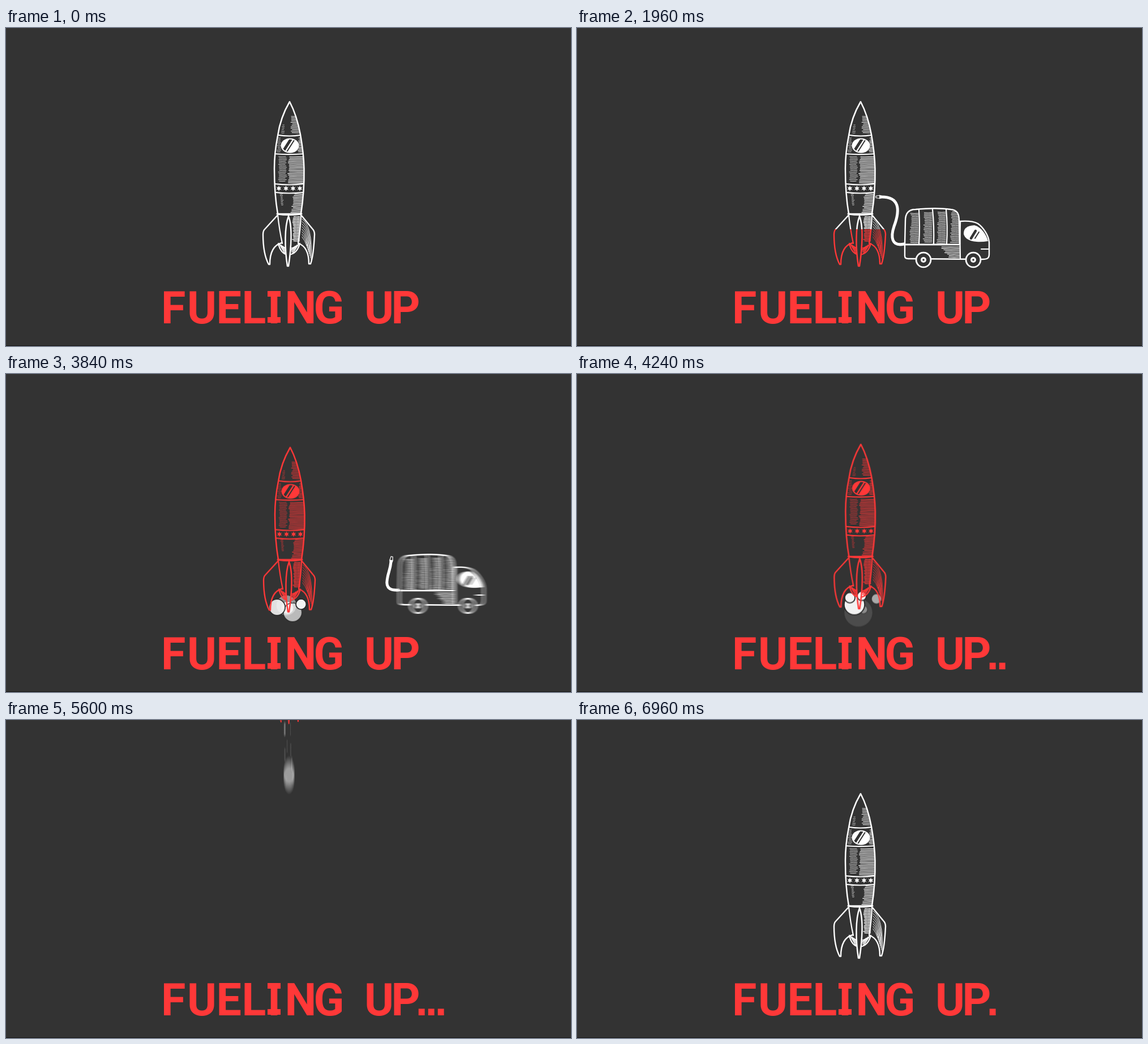
Write an HTML page with a canvas that moves like this. It is 998 px wide and 561 px high and loops after 7 s.

```html
<!DOCTYPE html>
<html lang="en">
<head>
<meta charset="utf-8">
<title>Fueling up</title>
<style>
  html, body { margin: 0; width: 100%; height: 100%; overflow: hidden; background: #333; }
  canvas, svg { position: absolute; left: 0; top: 0; width: 998px; height: 561px; }
  text { font: 700 79px Roboto, sans-serif; fill: #ff3838; }
  .dot { font: 700 77px "Liberation Sans", Arial, sans-serif; }
</style>
</head>
<body>
<canvas id="stage" width="998" height="561"></canvas>
<svg viewBox="0 0 998 561">
  <text y="520.5" x="274 320 371.5 416.5 462 492.5 543.5 605 633 680.5">FUELING UP</text>
  <path d="M462 464h23v10h-23zM462 510h23v10h-23z" fill="#ff3838"/>
  <text class="dot" x="723.5" y="520.5">.</text>
  <text class="dot" x="740.5" y="520.5">.</text>
  <text class="dot" x="757.5" y="520.5">.</text>
  <path d="M0 560h998v1H0z" fill="#151515"/>
</svg>
<script>
const W = 998, H = 561, LOOP = 7000, SHUTTER = 20;
const BG = '#333333', WHITE = '#ffffff', RED = '#ff3838';
const ctx = document.getElementById('stage').getContext('2d');
const dots = document.querySelectorAll('.dot');

function surface() {
  const c = document.createElement('canvas');
  c.width = W;
  c.height = H;
  const g = c.getContext('2d');
  g.lineCap = g.lineJoin = 'round';
  return g;
}

function seeded(s) {
  return () => (s = (s * 16807) % 2147483647) / 2147483647;
}

const clamp = (v, a = 0, b = 1) => Math.max(a, Math.min(b, v));
const mix = (a, b, k) => a + (b - a) * k;
const ramp = (t, a, b) => clamp((t - a) / (b - a));
const smooth = u => u * u * (3 - 2 * u);

function line(g, d, color, width) {
  g.strokeStyle = color;
  g.lineWidth = width;
  g.stroke(new Path2D(d));
}

function shape(g, d, color) {
  g.fillStyle = color;
  g.fill(new Path2D(d));
}

function disc(g, x, y, rx, color, ry = rx) {
  g.fillStyle = color;
  g.beginPath();
  g.ellipse(x, y, rx, ry, 0, 0, 7);
  g.fill();
}

// Rows of short engraved strokes; the left end moves from x1 to x2 with some noise.
function hatch(g, rnd, color, y1, y2, x1, x2, right, step = 2.6, noise = 4, width = 1.1) {
  for (let y = y1; y <= y2; y += step) {
    const x = mix(x1, x2, (y - y1) / (y2 - y1)) + rnd() * noise;
    const end = typeof right === 'function' ? right(rnd) : right;
    line(g, `M${x} ${y}Q${(x + end) / 2} ${y + 0.8} ${end} ${y}`, color, width);
  }
}

function star(g, x, y, color) {
  g.fillStyle = color;
  g.beginPath();
  for (let i = 0; i < 12; i++) {
    const r = i % 2 ? 2.3 : 5, a = i * Math.PI / 6 - Math.PI / 2;
    g.lineTo(x + r * Math.cos(a), y + r * Math.sin(a));
  }
  g.fill();
}

function makeRocket(color) {
  const g = surface(), rnd = seeded(77);
  const body = 'M501 130C491 147 483 169 480 190C477 205 474 228 474 248C474 280 476 305 480 328' +
    'L521 328C525 302 527 275 526.5 248C526 226 523 205 520 188C516 166 510 147 501 130Z';
  g.save();
  g.clip(new Path2D(body));
  hatch(g, rnd, color, 156, 187, 504, 501, 530, 2.6, 4, 1);
  hatch(g, rnd, color, 171, 187, 488, 486, r => 490 + r() * 2, 2.8, 1, 0.7);
  hatch(g, rnd, color, 194, 220, 517, 515, 530, 2.7, 2);
  hatch(g, rnd, color, 194, 220, 480, 478, r => 484 + r() * 2, 2.7, 2, 0.7);
  hatch(g, rnd, color, 227, 273, 499, 497, 530, 2.7, 3, 1.2);
  hatch(g, rnd, color, 227, 272, 481, 481, r => 493 + r() * 3, 2.7, 2, 0.8);
  hatch(g, rnd, color, 293, 326, 507, 503, 530, 2.7, 4, 1.2);
  hatch(g, rnd, color, 293, 312, 484, 486, r => 488 + r() * 2, 2.7, 1, 0.8);
  g.restore();

  line(g, body, color, 2.5);
  line(g, 'M481 189Q501 192 520 189M475 222Q500 224 525 222M475 275Q500 278 526 275' +
    'M476 290Q500 293 525 290', color, 2.2);
  line(g, 'M479 328Q500 331 522 328', color, 3);
  for (const x of [482, 494.5, 507, 519]) star(g, x, 283, color);

  disc(g, 501.5, 207.5, 16, color, 13);
  g.save();
  g.beginPath();
  g.ellipse(501.5, 207.5, 14, 11, 0, 0, 7);
  g.clip();
  g.globalCompositeOperation = 'destination-out';
  line(g, 'M488 220L504 195', '#000', 5);
  line(g, 'M495 220L509 198', '#000', 2);
  g.restore();

  // tail section
  hatch(g, rnd, color, 333, 377, 506, 506, 518.5, 2.5, 3, 1.3);
  line(g, 'M480 330Q483 357 488 380M521 330Q520 357 516 380', color, 2.2);
  line(g, 'M481 380Q485 399 499 400Q514 399 519 380', color, 2.2);
  for (let i = 0; i < 4; i++) {
    line(g, `M${483 + i * 3} ${381 + i * 2}L${493 + i} ${398 - i * 3}` +
      `M${517 - i * 3} ${381 + i * 2}L${506 - i} ${398 - i * 3}`, color, 1.8);
  }
  for (let i = 0; i < 8; i++) {
    line(g, `M523 ${337 + i * 4.5}Q${542 - i * 2} ${350 + i * 3.5} ${539 - i * 1.1} ${409 - i * 3.5}`, color, 0.9);
  }
  line(g, 'M479 331L457 355Q454 358 454 364C454 386 458 406 464 417L466 417' +
    'C466 397 472 383 487 379', color, 2.4);
  line(g, 'M522 331L541 354Q545 358 545 364C544 386 542 405 538 416L535 416' +
    'C535 398 530 385 517 380', color, 2.4);
  const fin = 'M499 332C492 350 492 388 497 420L499 420C504 388 506 350 499 332Z';
  g.globalCompositeOperation = 'destination-out';
  shape(g, fin, '#000');
  g.globalCompositeOperation = 'source-over';
  line(g, fin, color, 2.5);
  return g.canvas;
}

function makeTruck() {
  const g = surface(), rnd = seeded(41);
  const cargo = 'M579 382L580 340C580 326 586 320 598 320C620 318 645 318 660 320' +
    'C672 321 675 328 675 340L676 382Z';
  const base = 'M579 382L676 382L677 341C690 340 700 341 708 345C718 352 727 366 728 378' +
    'L728 399C728 406 725 408 716 408L585 407Q579 407 579 402Z';
  shape(g, cargo, BG);
  shape(g, base, BG);
  g.save();
  g.clip(new Path2D(cargo));
  [583, 607, 631, 655].forEach((x, i) => {
    hatch(g, rnd, WHITE, 327 - i, 379, x + 6, x + 4, x + 20, 2.7, 3, 1);
  });
  g.restore();
  hatch(g, rnd, WHITE, 386, 405, 641, 655, 676, 2.6, 5);
  line(g, cargo, WHITE, 2.4);
  line(g, base, WHITE, 2.4);
  line(g, 'M604 321Q606 350 604 381M628 320Q631 350 630 381M652 320Q655 350 653 381M676 341L677 406', WHITE, 2.2);

  const pane = 'M683 363C683 353 689 349 702 348C714 351 723 364 726 376C706 379 686 377 683 363Z';
  shape(g, pane, WHITE);
  line(g, 'M696 371L704 358', BG, 4.5);
  line(g, 'M703 371L710 360', BG, 2);
  line(g, 'M714 390L727 390', WHITE, 2);
  for (const x of [612, 700]) {
    disc(g, x, 409, 14.3, WHITE);
    disc(g, x, 409, 11.5, BG);
    disc(g, x, 409, 5, WHITE);
    disc(g, x, 409, 1.8, BG);
  }
  return g.canvas;
}

const whiteRocket = makeRocket(WHITE), redRocket = makeRocket(RED), truck = makeTruck();

// Motion
function truckX(t) {
  if (t < 3200) return -765 * (1 - ramp(t, 0, 1075)) ** 3;
  return 4.4e-7 * (t - 3200) ** 3;
}

// The truck tips forward while it brakes.
const lean = t => 0.38 * (1 - ramp(t, 0, 1075));

function lift(t) {
  return 0.08 * Math.max(0, t - 4160) + 0.00095 * Math.max(0, t - 5040) ** 2;
}

function rocketY(t) {
  return t < 5900 ? -lift(t) : 434 * (1 - ramp(t, 6030, 6960)) ** 2.5;
}

// Rocket and smoke get slimmer with speed.
const slim = t => t < 5900 ? 1 - 0.58 * ramp(t, 5050, 5600) ** 1.5 : 1;

// Puffs: [x, y, radius, birth]
const exhaust = [[482, 374, 28, 483], [460, 382, 13, 445], [458, 350, 14, 432],
  [432, 372, 9, 372], [407, 372, 19, 426]];
const smoke = [[533, 385, 10, 2880], [487, 403, 24, 2932], [505, 390, 14.6, 2998],
  [477, 385, 10, 3130], [497, 405, 10, 3130], [497, 401, 25, 3682], [506, 397, 7.4, 3772],
  [529, 380, 10, 3844], [490, 395, 26, 3970], [482, 383, 13, 3970], [503, 383, 14, 4030],
  [500, 416, 26, 5180]];
const rnd = seeded(2024);
for (const [from, to] of [[20, 340], [620, 820]]) {
  for (let b = from; b < to; b += 40) {
    exhaust.push([565 + truckX(b) - rnd() * 20, 352 + rnd() * 30, 8 + rnd() * 12, b]);
  }
}
for (const [from, to] of [[3410, 3640], [4250, 5560]]) {
  for (let b = from; b < to; b += 65) {
    const k = b > 5000 ? 0.4 : 1;
    smoke.push([498 + (rnd() - 0.5) * 50 * (k + 1) / 2, 385 + rnd() * 18, (8 + rnd() * 17) * k, b]);
  }
}

function puffs(g, list, t, life, drop, shift) {
  for (const [x, y, r, b] of list) {
    const a = (t - b) / life;
    if (a <= 0 || a >= 1) continue;
    const e = 1 - (1 - a) ** 2;
    g.globalAlpha = 1 - clamp((a - 0.45) / 0.55);
    g.beginPath();
    g.arc(x, y + drop * e + shift * (1 - 0.25 * a), r * e, 0, 7);
    g.fillStyle = '#f3f3f3';
    g.fill();
    if (drop) {
      g.strokeStyle = '#272727';
      g.lineWidth = 1.8;
      g.stroke();
    }
  }
  g.globalAlpha = 1;
}

// Draws a layer averaged over the shutter time along one axis.
const layer = surface(), blend = surface();
function smear(t, pos, vertical, anchor, draw) {
  layer.clearRect(0, 0, W, H);
  draw(layer);
  const span = Math.abs(pos(t + SHUTTER / 2) - pos(t - SHUTTER / 2));
  const n = clamp(Math.ceil(span / 1.5), 1, 15);
  const put = (g, s) => {
    const d = pos(s) - anchor;
    g.drawImage(layer.canvas, vertical ? 0 : d, vertical ? d : 0);
  };
  if (n === 1) return put(ctx, t);
  blend.clearRect(0, 0, W, H);
  blend.globalCompositeOperation = 'lighter';
  blend.globalAlpha = 1 / n;
  for (let i = 0; i < n; i++) put(blend, t + ((i + 0.5) / n - 0.5) * SHUTTER);
  ctx.drawImage(blend.canvas, 0, 0);
}

// Hose poses: start, then two cubic segments
const restPose = [578, 381, 566, 382, 554, 380, 557.5, 362, 559, 350, 563, 345, 564, 332];
const plugPose = [578, 381, 555, 386, 554, 368, 560, 350, 572, 318, 568, 298, 538, 298];

function hose(t) {
  const grow = smooth(ramp(t, 800, 1060));
  if (!grow) return;
  const k = smooth(ramp(t, 1000, 1420)) * (1 - smooth(ramp(t, 2920, 3300)));
  const p = restPose.map((v, i) => mix(i % 2 ? 381 : 580, mix(v, plugPose[i], k), grow));
  ctx.save();
  ctx.lineCap = 'round';
  ctx.translate(truckX(t), 0);
  line(ctx, `M${p[0]} ${p[1]}C${p.slice(2, 8)}C${p.slice(8)}`, WHITE, 5);
  ctx.translate(p[12], p[13]);
  ctx.rotate(mix(-80, -180, k) * Math.PI / 180);
  ctx.scale(grow, grow);
  shape(ctx, 'M0 -2.5L4 -3.5L4 3.5L0 2.5Z', WHITE);
  line(ctx, 'M4 -2.5L10 -1.5L10 1.5L4 2.5', WHITE, 1.2);
  ctx.restore();
}

function drawRocket(t) {
  const level = t < 5900 ? mix(423, 126, smooth(ramp(t, 1550, 2880))) : 423;
  const cut = Math.round(level), y = rocketY(t);
  ctx.drawImage(whiteRocket, 0, 0, W, cut, 0, y, W, cut);
  ctx.drawImage(redRocket, 0, cut, W, H - cut, 0, y + cut, W, H - cut);
}

function drawTruck(g, t) {
  const k = lean(t);
  g.save();
  g.transform(1, 0, -k, 1, k * 395, 0);
  g.drawImage(truck, 0, 0);
  g.restore();
}

function render(t) {
  ctx.fillStyle = BG;
  ctx.fillRect(0, 0, W, H);

  if (t < 1150) {
    smear(t, truckX, false, truckX(t), g => puffs(g, exhaust, t, 260, 0, 0));
  }

  ctx.save();
  ctx.translate(500, 0);
  ctx.scale(slim(t), 1);
  ctx.translate(-500, 0);
  const launching = t > 2880 && t < 5900;
  if (launching) {
    smear(t, rocketY, true, rocketY(t), g => puffs(g, smoke, t, 600, 25, rocketY(t)));
    ctx.translate(Math.sin(t * 0.05 - 1.9), 0.5 * Math.sin(t * 0.07));
  }
  drawRocket(t);
  ctx.restore();

  if (t < 4400) {
    hose(t);
    smear(t, truckX, false, 0, g => drawTruck(g, t));
  }

  const count = Math.floor(((t + 120) % 960) / 240);
  dots.forEach((d, i) => { d.style.visibility = i < count ? 'visible' : 'hidden'; });
}

const start = performance.now();
function tick() {
  render((performance.now() - start) % LOOP);
  requestAnimationFrame(tick);
}
tick();
</script>
</body>
</html>
```
